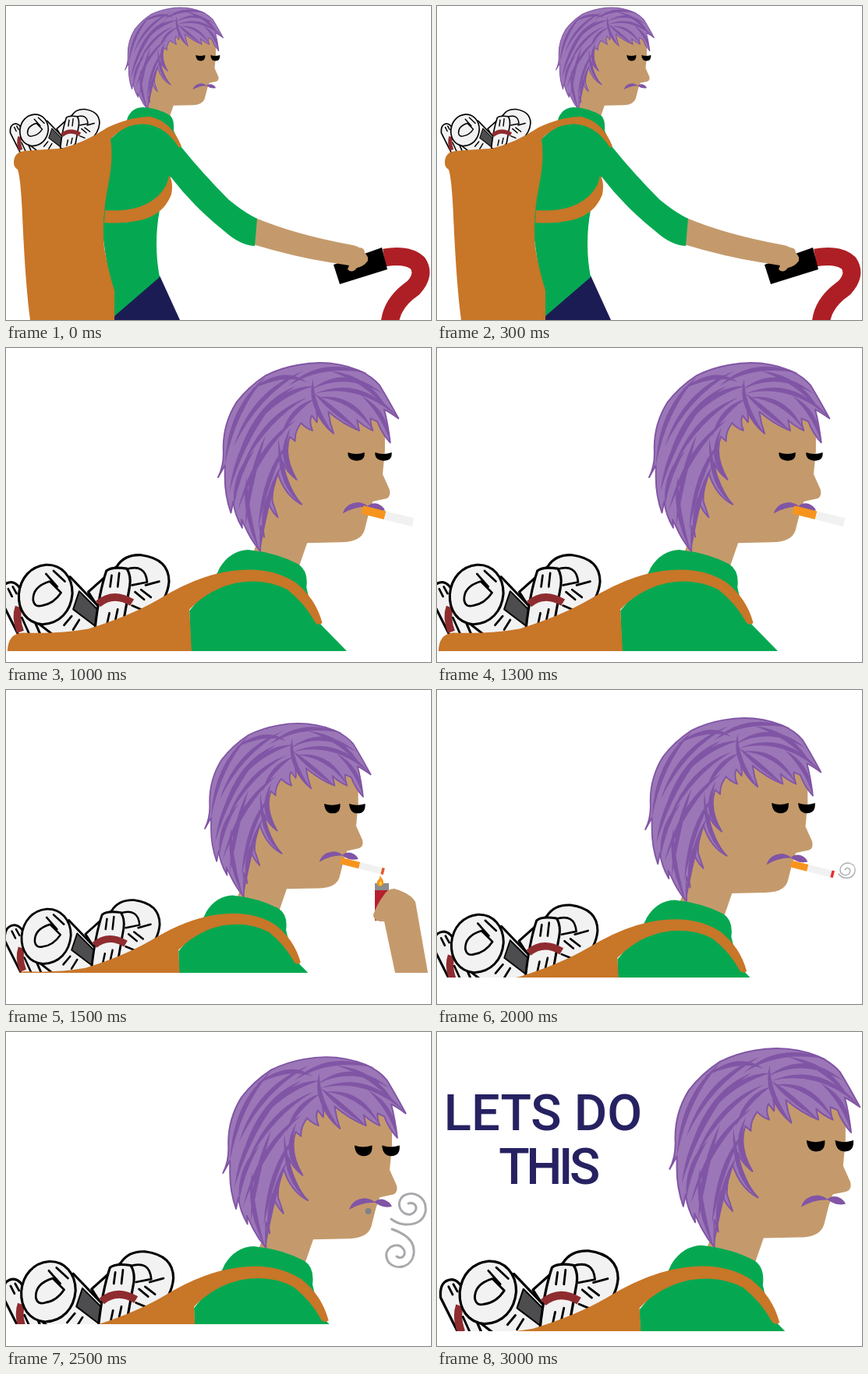
Animation of 545x403 px, one loop 3500 ms. Source, as an HTML page:

```html
<!DOCTYPE html>
<html lang="en">
<head>
<meta charset="utf-8">
<title>Lets do this</title>
<style>
html, body { margin: 0; width: 100%; height: 100%; overflow: hidden; background: #fff; }
svg { display: block; width: 100%; height: 100%; }
text { font: 500 65px Roboto, Arial, sans-serif; text-anchor: middle; fill: #262262; }
.tight { letter-spacing: -4.5px; }
</style>
</head>
<body>
<svg id="stage" viewBox="0 0 545 403"></svg>
<script>
const SKIN = '#c49a6c', GREEN = '#05a851', BAG = '#c87628', DARK = '#8155a5',
  LIGHT = '#9b77b7', NAVY = '#1c1c54', ORANGE = '#f7941e', SMOKE = '#a7a9ac';
const STEP = 500;

const fill = (d, c) => `<path d="${d}" fill="${c}"/>`;
const line = (d, c, w, cap = 'round') => `<path d="${d}" fill="none" stroke="${c}" stroke-width="${w}" stroke-linecap="${cap}" stroke-linejoin="round"/>`;
const place = (s, [x, y, k]) => `<g transform="translate(${x} ${y}) scale(${k})">${s}</g>`;

// A lock of hair: a curve that is thick in the middle and sharp at both ends
function lock(s) {
  const [x, y, cx, cy, ex, ey] = s.split(' ').map(Number);
  const len = Math.hypot(ex - x, ey - y), w = 6;
  const nx = (y - ey) / len * w, ny = (ex - x) / len * w;
  return `M${x},${y}Q${cx + nx},${cy + ny} ${ex},${ey}Q${cx - nx},${cy - ny} ${x},${y}Z`;
}

const hairShape = `M338,264Q326,250 318,232L313,222L314,233Q304,216 302,198L299,213
  Q291,190 291,166L291,150L282,166Q290,150 289,130Q288,96 306,67Q322,46 345,31Q365,21 388,17
  Q430,9 468,24Q486,32 496,44Q507,62 521,88Q510,80 502,76
  Q507,95 510,120Q499,108 493,92L484,88Q484,97 487,104Q474,98 466,90L469,104
  Q448,96 428,79Q430,94 435,108Q420,96 412,78Q414,86 413,93L406,84Q402,92 407,104Q397,100 392,94
  Q383,106 384,118L377,112Q368,138 386,169Q372,158 368,146Q372,180 393,202
  Q370,190 361,160Q353,182 354,198L361,219Q349,207 347,193Q338,215 343,245L338,230Z`;

const locks = ['345 33 300 75 291 150', '395 25 330 55 303 125', '385 45 335 70 308 140',
  '400 60 345 85 314 152', '350 75 310 120 297 185', '385 90 335 125 308 210',
  '345 110 325 160 318 230', '375 120 345 160 335 235', '366 150 345 190 338 262',
  '330 130 305 160 303 203', '320 165 316 210 337 264', '410 45 370 50 345 82',
  '410 62 380 75 365 112', '375 45 420 10 480 28', '405 50 450 20 500 55',
  '410 55 470 35 521 87', '415 60 460 58 487 103', '410 55 432 75 469 104',
  '430 25 480 35 508 78', '408 35 402 70 434 107', '400 40 370 22 325 50',
  '472 58 503 80 510 119', '362 115 364 175 393 202', '378 100 360 140 386 169'];

const hair = fill(hairShape, LIGHT) + fill(locks.map(lock).join(''), DARK) + line(hairShape, DARK, 2);

function head(open) {
  const eye = open
    ? 'M454,130Q465,134 477,130Q478,144 466,144Q455,144 454,130Z'
    : 'M454,133Q465,137 476,133Q477,144 465,144Q453,143 454,133Z';
  return fill(`M350,80L440,50L496,70L503,95L503,130L500,162L509,182Q512,194 501,195L487,198L482,212
      L476,236Q471,252 445,252L400,253L382,305L316,300L340,235Z`, SKIN) + hair +
    fill(eye, '#000') + `<g transform="translate(36 0)">${fill(eye, '#000')}</g>` +
    fill('M447,214Q451,200 468,199Q476,200 480,204Q486,199 493,201Q501,204 503,210Q491,213 481,205Q464,204 447,214Z', DARK);
}

function roll(d, marks, band) {
  return `<path d="${d}" fill="#f2f2f2" stroke="#000" stroke-width="3.2" stroke-linejoin="round"/>` +
    (band ? line(band, '#8f2c2f', 10, 'butt') : '') + line(marks, '#000', 2.8);
}

const papers =
  roll('M-6,328Q-8,306 8,305Q18,306 24,322L48,378L20,380Z', 'M4,314L9,324M10,311L15,320M22,352L32,374', 'M18,338Q13,352 20,371') +
  roll('M148,284Q158,268 180,269Q217,274 217,304Q215,328 195,345L140,365L110,318Z',
    'M160,288Q186,280 188,305L168,309M186,309L204,304M172,318L184,328M180,315L193,325M168,336L180,341') +
  roll('M86,298L132,346L118,372L70,380L34,352Z', 'M88,350L78,362M98,355L90,368') +
  fill('M98,317L127,346L119,363L90,341Z', '#4d4d4f') + line('M98,317L127,346L119,363L90,341Z', '#000', 2) +
  roll('M54,282C75,281 89,298 89,320C87,344 72,360 49,361C28,359 17,342 18,321C20,299 34,284 54,282Z',
    'M59,304Q36,311 37,329Q39,339 49,336Q64,334 74,319ZM54,294L69,311M64,290L79,304') +
  roll('M134,290Q141,284 161,287Q167,296 165,310L157,355L140,372L119,366Q124,320 134,290Z',
    'M141,296L139,311M151,293L149,311M138,346L135,360M149,341L146,355', 'M123,334Q143,317 168,332');

const shoulders =
  fill(`M246,400L244,343Q278,302 284,286Q298,263 322,262Q360,266 388,281Q402,290 399,312L408,350L420,363L456,400Z`, GREEN) +
  fill(`M3,400Q2,374 22,372Q70,374 110,367Q165,350 203,328Q255,296 300,290Q350,283 384,305Q411,326 420,359
    Q416,363 411,359Q397,333 374,315Q344,299 306,306Q270,314 244,341L247,400Z`, BAG);

// Head, papers and bag, cut off along the bottom edge
let clips = 0;
function bust(pos, bottom, open) {
  const id = 'cut' + clips++;
  return `<clipPath id="${id}"><rect width="545" height="${bottom}"/></clipPath>
    <g clip-path="url(#${id})">${place(head(open) + papers + shoulders, pos)}</g>`;
}

function cigarette(x, y, w, filter, len, tip) {
  const bar = (a, n, c) => `<rect x="${a}" y="${-w / 2}" width="${n}" height="${w}" fill="${c}"/>`;
  return `<g transform="translate(${x} ${y}) rotate(14)">${bar(0, filter, ORANGE)}${bar(filter, len - filter, '#f1f1f2')}${
    tip ? bar(len, 3.5, tip) : ''}</g>`;
}

const walker =
  place(head(true), [4, -5.5, .527]) +
  place(papers, [8.6, -5.5, .513]) +
  fill('M138,403L140,394L197,346L223,403Z', NAVY) +
  line('M485,323Q515,318 528,330Q538,345 522,362Q493,382 492,410', '#ad1f25', 23, 'butt') +
  fill('M420,332L482,310L489,338L428,357Z', '#000') +
  fill(`M320,272Q370,293 440,306Q448,307 453,310Q460,310 460,317Q465,321 464,327Q458,335 450,336Q444,344 438,338
    L440,333Q428,331 415,329Q370,322 317,306Z`, SKIN) +
  fill(`M132,172Q154,155 156,143Q162,130 176,130Q196,131 211,141Q216,146 215,160L224,180Q252,215 285,248
    Q304,264 322,273L319,308Q300,307 280,289Q240,257 211,219L212,238L197,262Q189,305 197,348L139,398L122,280Z`, GREEN) +
  fill(`M10,201Q10,187 25,186Q50,184 70,183Q100,176 130,156Q160,142 185,142Q212,148 225,180L222,182
    Q216,172 206,163Q184,145 156,155Q142,162 134,171Q138,195 131,230Q122,275 126,310Q131,340 139,365L139,403L31,403
    Q25,360 21,270Q19,222 15,210Q10,207 10,201Z`, BAG) +
  fill('M127,262Q165,265 187,250Q207,236 209,217Q215,226 212,242Q202,268 172,275Q148,280 126,278Z', BAG);

const lighter =
  fill('M473,256H491V270L486,296H473Z', '#b5202e') +
  fill('M473,248H491V257H473Z', '#8a8c8e') +
  fill('M478,252Q473,247 478,243Q480,241 479,238Q485,244 484,249Q483,252 478,252Z', ORANGE) +
  fill('M480,251Q477,248 481,245Q483,249 480,251Z', '#fdd835') +
  fill('M484,264Q489,255 498,255Q519,261 525,272L541,363H499L485,297Q471,298 471,288Q477,273 484,264Z', SKIN);

const wisp = line('M515,236C520,243 533,244 536,233C538,222 523,218 518,227C514,236 524,241 529,235C532,229 525,226 523,231', SMOKE, 1.3);
const puffs = line(`M494,240C508,251 534,250 538,230C540,211 522,203 510,210C498,220 507,236 519,234C530,230 527,217 516,220
  M495,253C515,260 524,270 523,283C522,301 502,307 491,296C482,282 494,270 506,275C517,283 508,294 501,288`, SMOKE, 3);

const scenes = [
  walker,
  bust([0, .5, 1], 391, false),
  bust([-1, 5.3, .968], 389, false) + cigarette(457, 207.5, 11, 30, 67),
  bust([4, 30.2, .89], 363, true) + cigarette(429, 219, 8.5, 25, 54, '#e0592a') + lighter,
  bust([1.5, 22.6, .942], 369, true) + cigarette(454, 223, 9, 22, 53, '#e5322d') + wisp,
  bust([2, 18.2, .98], 375, true) + '<circle cx="464.5" cy="230" r="4" fill="#808285"/>' + puffs,
  bust([10.8, 6.5, 1.02], 384, true) + '<text x="136" y="126">LETS DO</text><text class="tight" x="142" y="195">THIS</text>'
];

const stage = document.getElementById('stage');
stage.innerHTML = scenes.map(s => `<g visibility="hidden">${s}</g>`).join('');
const groups = [...stage.children];

function draw(ms) {
  const now = Math.floor(ms / STEP) % groups.length;
  groups.forEach((g, i) => g.setAttribute('visibility', i === now ? 'visible' : 'hidden'));
}

const start = performance.now();
function tick() {
  draw(performance.now() - start);
  requestAnimationFrame(tick);
}
tick();
</script>
</body>
</html>
```
